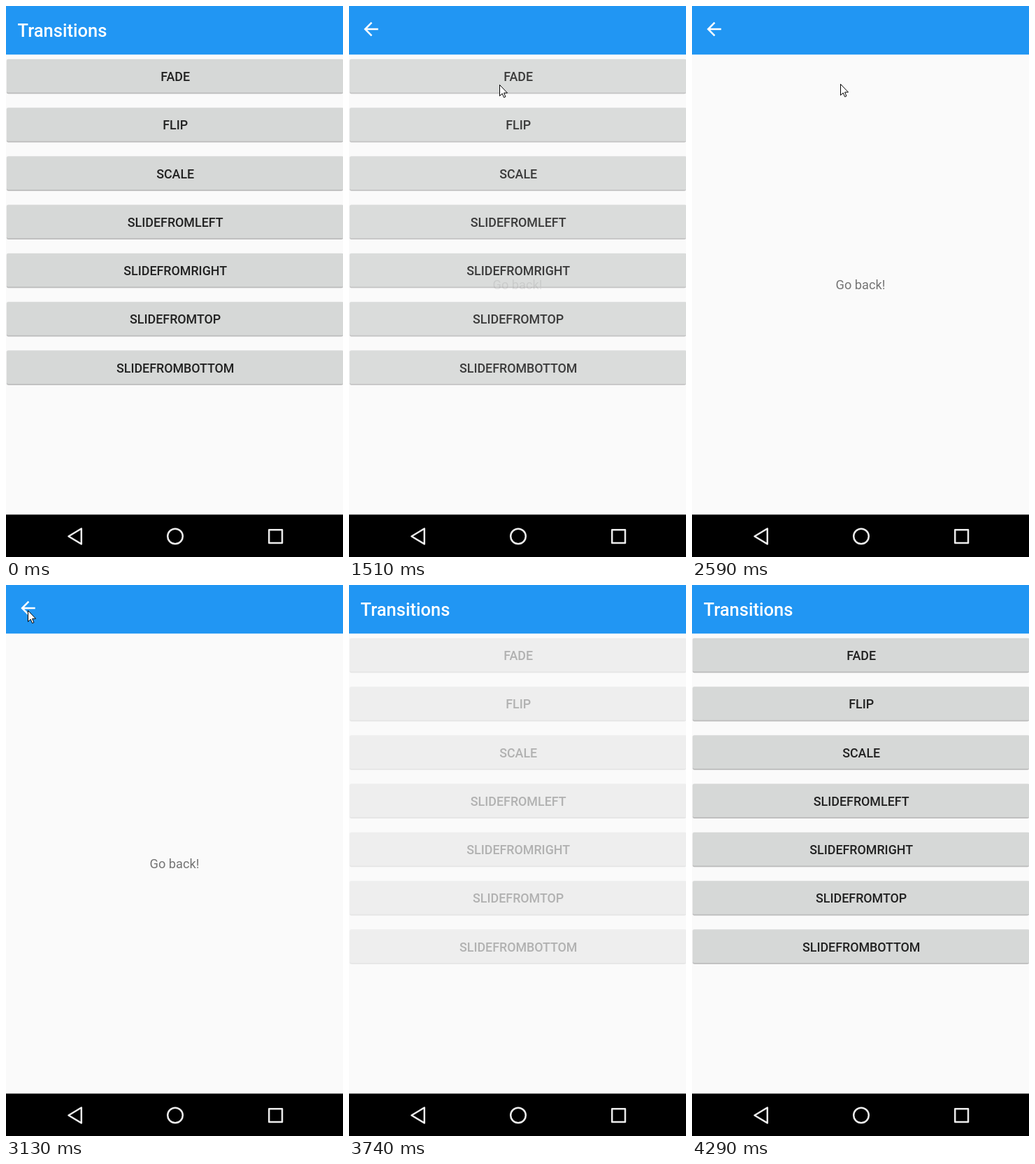
Recreate the animation shown at these times as an HTML page. Size 482x786 px, loop 4910 ms.

```html
<!DOCTYPE html>
<html lang="en">
<head>
<meta charset="utf-8">
<title>Page transitions</title>
<style>
  html, body { margin: 0; width: 100%; height: 100%; overflow: hidden; background: #fafafa; }
  svg { display: block; width: 482px; height: 786px; }
  text { font-family: Roboto, sans-serif; }
  .label { font-size: 17.85px; font-weight: 500; text-anchor: middle; fill: #212121; }
  .title { font-size: 25.5px; font-weight: 500; fill: #fff; }
  .note { font-size: 18.2px; text-anchor: middle; fill: #757575; }
  .nav { fill: none; stroke: #ececec; stroke-width: 2.5; stroke-linejoin: round; }
</style>
</head>
<body>
<svg viewBox="0 0 482 786">
  <defs>
    <clipPath id="firstButton"><rect x="1" y="76" width="481" height="47.5" rx="2"/></clipPath>
  </defs>
  <rect width="482" height="786" fill="#fafafa"/>
  <g id="list"></g>
  <g clip-path="url(#firstButton)"><circle id="press" cx="215" cy="112"/></g>
  <text id="note" class="note" x="241" y="404">Go back!</text>
  <rect width="482" height="69.3" fill="#2196f3"/>
  <text id="title" class="title" x="16.5" y="44">Transitions</text>
  <circle id="tap" cx="31" cy="33"/>
  <path id="back" fill="#fff" transform="translate(16.2 17.7) scale(1.275)"
    d="M20 11H7.83l5.59-5.59L12 4l-8 8 8 8 1.41-1.41L7.83 13H20z"/>
  <rect y="725.5" width="482" height="61" fill="#000"/>
  <g class="nav">
    <path d="M89.5 756.5L107.8 745.5V767.5Z"/>
    <circle cx="242" cy="756.5" r="10.8"/>
    <rect x="376.2" y="747.2" width="18.8" height="18.8"/>
  </g>
  <path id="cursor" fill="#fff" stroke="#000" d="M.5 .5V16.3L4.2 12.9L6.6 18.5L8.9 17.5L6.6 12H11.5Z"/>
</svg>
<script>
const LOOP = 4910;
const $ = id => document.getElementById(id);
const [list, press, note, title, tap, back, cursor] =
  ['list', 'press', 'note', 'title', 'tap', 'back', 'cursor'].map($);

const names = ['FADE', 'FLIP', 'SCALE', 'SLIDEFROMLEFT', 'SLIDEFROMRIGHT', 'SLIDEFROMTOP', 'SLIDEFROMBOTTOM'];
list.innerHTML = names.map((name, i) => `
  <g transform="translate(0 ${(76 + i * 69.25).toFixed(2)})">
    <rect x=".4" y="-.5" width="482" height="50" rx="3" fill="#000" opacity=".06"/>
    <rect x="1" y="1" width="481" height="48.3" rx="2.5" fill="#000" opacity=".2"/>
    <rect x="1" width="482" height="47.5" rx="2" fill="#d6d8d7"/>
    <text class="label" x="242.2" y="31.2">${name}</text>
  </g>`).join('');

// Screen refreshes: [first ms, last ms, count]
const runs = [
  [0, 0, 1], [120, 580, 7], [660, 810, 3], [1210, 1670, 7], [1750, 1980, 4],
  [2130, 2130, 1], [2590, 3050, 7], [3130, 3130, 1], [3370, 3820, 7], [3920, 4290, 6]
];
const ticks = runs.flatMap(([a, b, n]) =>
  Array.from({ length: n }, (_, i) => n > 1 ? Math.floor((a + (b - a) * i / (n - 1)) / 10) * 10 : a));
const lastTick = t => ticks.filter(k => k <= t).pop();

const ramp = (t, a, b) => Math.min(1, Math.max(0, (t - a) / (b - a)));
const mix = (a, b, u) => a + (b - a) * u;
const easeOut = u => 1 - (1 - u) ** 2;
const smoother = u => u * u * u * (u * (u * 6 - 15) + 10);

// Pointer legs: [start, end, from x, y, to x, y, easing]
const legs = [
  [120, 580, 415, 605, 218, 145, easeOut],
  [580, 810, 218, 145, 215, 112, easeOut],
  [2510, 3130, 215, 112, 31, 36, smoother]
];

const OPEN = 1430, CLOSE = 3500;
const show = (el, on) => el.setAttribute('visibility', on ? 'visible' : 'hidden');

function ripple(el, t, start, end, from, to) {
  const u = ramp(t, start, end);
  show(el, t >= start && t < end);
  el.setAttribute('r', mix(from, to, easeOut(Math.min(1, u * 1.4))));
  el.setAttribute('opacity', mix(.12, .06, u));
}

function draw(time) {
  const t = lastTick(time % LOOP);
  const opening = ramp(t, OPEN, 2097);
  const closing = ramp(t, CLOSE, 4230);
  const detail = t >= OPEN && t < CLOSE;

  list.setAttribute('opacity', t < CLOSE ? 1 - opening : closing);
  note.setAttribute('opacity', detail ? 1 - (1 - opening) ** 1.3 : 0);
  show(title, !detail);
  show(back, detail);
  ripple(press, t, 1210, OPEN, 60, 290);
  ripple(tap, t, 3370, CLOSE, 16, 24);

  const [a, b, x0, y0, x1, y1, ease] = legs.filter(leg => leg[0] <= t).pop() || legs[0];
  const u = ease(ramp(t, a, b));
  cursor.setAttribute('transform', `translate(${Math.round(mix(x0, x1, u))} ${Math.round(mix(y0, y1, u))})`);
  show(cursor, t >= 120 && t < CLOSE);
}

const start = performance.now();
function loop() {
  draw(performance.now() - start);
  requestAnimationFrame(loop);
}
draw(0);
requestAnimationFrame(loop);
</script>
</body>
</html>
```
